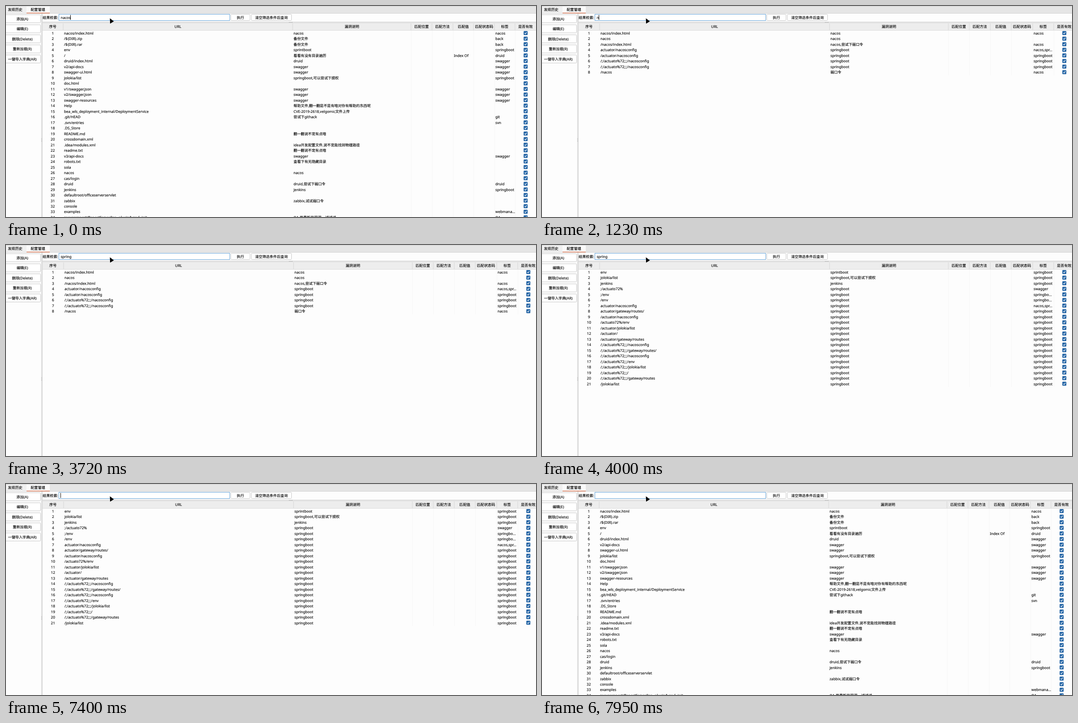
An HTML page for the animation above (8 s loop, 1187x472 px).

```html
<!DOCTYPE html>
<html lang="zh-CN">
<head>
<meta charset="utf-8">
<style>
html, body { margin: 0; width: 100%; height: 100%; overflow: hidden; background: #fdfdfd; }
svg { display: block; }
text {
  font: 8.15px "Noto Sans", "Noto Sans CJK SC", "Noto Sans CJK", sans-serif;
  fill: #000; stroke: #000; stroke-width: .12px;
  text-rendering: geometricPrecision; white-space: pre;
}
.mid { text-anchor: middle; }
</style>
</head>
<body>
<svg id="stage" width="1187" height="472" viewBox="0 0 1187 472"></svg>
<script>
const HEADERS = ['序号', 'URL', '漏洞说明', '匹配位置', '匹配方法', '匹配值', '匹配状态码', '标签', '是否有效'];
const WIDE = [81.5, 128, 642, 907.5, 954, 1001, 1047.5, 1094, 1140, 1187];
const FILTERED = [81.5, 129, 644, 910, 957, 1004, 1051, 1099, 1146, 1193];

// Each row: url|description|tag|matched value
const ALL_ROWS = `nacos/index.html|nacos|nacos
/\${DIR}.zip|备份文件|back
/\${DIR}.rar|备份文件|back
env|sprintboot|springboot
/|看看有没有目录遍历|druid|Index Of
druid/index.html|druid|swagger
v2/api-docs|swagger|swagger
swagger-ui.html|swagger|swagger
jolokia/list|springboot,可以尝试下提权|springboot
doc.html
v1/swagger.json|swagger|swagger
v2/swagger.json|swagger|swagger
swagger-resources|swagger|swagger
Help|帮助文件,翻一翻是不是有啥对你有帮助的东西呢
bea_wls_deployment_internal/DeploymentService|CVE-2019-2618,velgomic文件上传
.git/HEAD|尝试下githack|git
.svn/entries||svn
.DS_Store
README.md|翻一翻说不定有点啥
crossdomain.xml
.idea/modules.xml|idea开发配置文件,说不定能找到物理路径
readme.txt|翻一翻说不定有点啥
v3/api-docs|swagger|swagger
robots.txt|查看下有无隐藏目录
sola
nacos|nacos
cas/login
druid|druid,尝试下弱口令|druid
jenkins|jenkins|springboot
defaultroot/officeserverservlet
zabbix|zabbix,试试弱口令
console
examples||webmana...
seeyonreport/ReportServer?op=plugin&cmd=init|OA,用最新的漏洞，试试试|OA`;

const NACOS_ROWS = `nacos/index.html|nacos|nacos
nacos|nacos
/nacos/index.html|nacos,尝试下弱口令|nacos
actuator/nacosconfig|springboot|nacos,spr...
/actuator/nacosconfig|springboot|springboot
/;/actuato%72;;;/nacosconfig|springboot|springboot
/;/actuato%72;;;/nacosconfig|springboot|springboot
/nacos|弱口令|nacos`;

const both = '|springboot|springboot';
const SPRING_ROWS = `env|sprintboot|springboot
jolokia/list|springboot,可以尝试下提权|springboot
jenkins|jenkins|springboot
;/actuato72%|springboot|swagger
;/env|springboot|springbo...
/env|springboot|springbo...
actuator/nacosconfig|springboot|nacos,spr...
` + ['actuator/gateway/routes/', '/actuator/nacosconfig', '/actuato72%/env', '/actuator/jolokia/list',
  '/actuator/', '/actuator/gateway/routes',
  ...['nacosconfig', 'gateway/routes/', 'nacosconfig', 'env', 'jolokia/list', '', 'gateway/routes']
    .map(path => '/;/actuato%72;;;/' + path),
  '/jolokia/list'].map(url => url + both).join('\n');

const rect = (x, y, w, h, fill, extra = '') =>
  `<rect x="${x}" y="${y}" width="${w}" height="${h}" fill="${fill}" ${extra}/>`;
const text = (x, y, str = '', cls = '') =>
  str && `<text x="${x}" y="${y}" class="${cls}">${str.replace(/&/g, '&amp;')}</text>`;
const button = (x, y, w, h, label) =>
  rect(x + .5, y + .5, w - 1, h - 1, '#fff', 'rx="2" stroke="#c6c6c6"') +
  text(x + w / 2, y + h / 2 + 3.1, label, 'mid');
const checkbox = (x, y) =>
  rect(x - 4.5, y - 4.5, 9, 9, '#2565a5', 'rx="1.5"') +
  `<path d="M${x - 2.3} ${y}l1.8 1.9 3-3.9" fill="none" stroke="#fff" stroke-width="1.2"/>`;

function table(id, cols, data) {
  const rows = data.split('\n');
  const centre = i => (cols[i] + cols[i + 1]) / 2;
  let out = rect(82, 38, 1105, 434, '#fdfdfd') + rect(82, 38, 1105, 16, '#ededed') +
    rect(82, 54, 1105, 1, '#dcdcdc');
  HEADERS.forEach((label, i) => {
    out += text(centre(i), 49.1, label, 'mid');
    if (i) out += rect(Math.floor(cols[i]) - .5, 39, 1, 15, '#d6d6d6');
    if (i > 2) out += rect(Math.floor(cols[i]), 55, 1, rows.length * 12.5, '#f6f6f6');
  });
  rows.forEach((row, i) => {
    const [url, note, tag, value] = row.split('|');
    const y = 63.8 + i * 12.49;
    out += text(centre(0), y, String(i + 1), 'mid') + text(cols[1] + 2, y, url) +
      text(cols[2] + 2, y, note) + text(cols[5] + 2, y, value) +
      text(cols[7] + 2, y, tag) + checkbox(centre(8) + .3, y - 3.3);
  });
  return `<g id="${id}">${out}</g>`;
}

const dots = (x, y, dx, dy) =>
  [0, 1, 2].map(i => rect(x + i * dx, y + i * dy, 1.2, 1.2, '#999')).join('');

document.getElementById('stage').innerHTML =
  rect(0, 0, 1187, 472, '#fdfdfd') +
  rect(0, 0, 1187, 16, '#e5e5e5') + rect(0, 0, 1187, 1, '#d2d2d2') + rect(0, 16, 1187, 1, '#d4d4d4') +
  rect(0, 1, 46, 15, '#f0f0f0') + rect(46, 1, 52, 15, '#fafafa') + rect(46, 15, 52, 1.4, '#d9704c') +
  text(20.5, 11.2, '发现历史', 'mid') + text(71.5, 11.2, '配置管理', 'mid') +
  ['添加(A)', '编辑(E)', '删除(Delete)', '重新加载(R)', '一键导入字典(AR)']
    .map((label, i) => button(-5, 19 + i * 22.5, 83, 19, label)).join('') +
  rect(79, 17, 3, 455, '#f2f2f2') + rect(79, 17, 1, 455, '#cfcfcf') + rect(81, 17, 1, 455, '#cfcfcf') +
  dots(79, 296, 0, 3) +
  text(82, 29.1, '结果检索:') +
  rect(118.5, 18.5, 382.5, 14, '#fff', 'stroke="#5f9fd6"') +
  button(503, 18, 44, 15, '执行') + button(549, 18, 91, 15, '清空筛选条件后查询') +
  rect(82, 35, 1105, 3, '#f2f2f2') + rect(82, 35, 1105, 1, '#d6d6d6') + rect(82, 37, 1105, 1, '#d0d0d0') +
  dots(634, 36, 3, 0) +
  table('all', WIDE, ALL_ROWS) + table('nacos', FILTERED, NACOS_ROWS) + table('spring', FILTERED, SPRING_ROWS) +
  '<text id="query" x="122.4" y="29.1"></text>' + rect(122, 20, 1, 11, '#000', 'id="caret"') +
  '<path d="M232.6 27.4L241.6 34.2 233.2 39.4Z"/>';

const TABLES = [[0, 'all'], [250, 'nacos'], [4000, 'spring'], [7950, 'all']];
// A trailing bar means the caret is lit.
const TYPING = [[0, 'nacos|'], [400, 'nacos'], [830, 'nac|'], [1080, 'na|'], [1230, 'n|'], [1380, '|'],
  [1780, ''], [1900, 's|'], [2300, 'sp|'], [2580, 'spr|'], [2890, 'spri|'], [3010, 'sprin|'],
  [3260, 'spring|'], [3720, 'spring'], [4310, 'spring|'], [4590, 'sprin|'], [4740, 'spri|'],
  [4860, 'spr|'], [4980, 'sp|'], [5130, 's|'], [5530, '|'], [5970, ''], [6530, '|'],
  [6930, ''], [7400, '|'], [7830, '']];

const $ = id => document.getElementById(id);
const at = (steps, t) => steps.filter(([start]) => start <= t).pop()[1];

function draw() {
  const t = performance.now() % 8000;
  const shown = at(TABLES, t), typed = at(TYPING, t);
  for (const id of ['all', 'nacos', 'spring']) $(id).style.display = id === shown ? '' : 'none';
  $('query').textContent = typed.replace('|', '');
  const width = $('query').textContent ? $('query').getComputedTextLength() : 0;
  $('caret').setAttribute('x', Math.floor(122.68 + width));
  $('caret').style.display = typed.endsWith('|') ? '' : 'none';
  requestAnimationFrame(draw);
}
draw();
</script>
</body>
</html>
```
